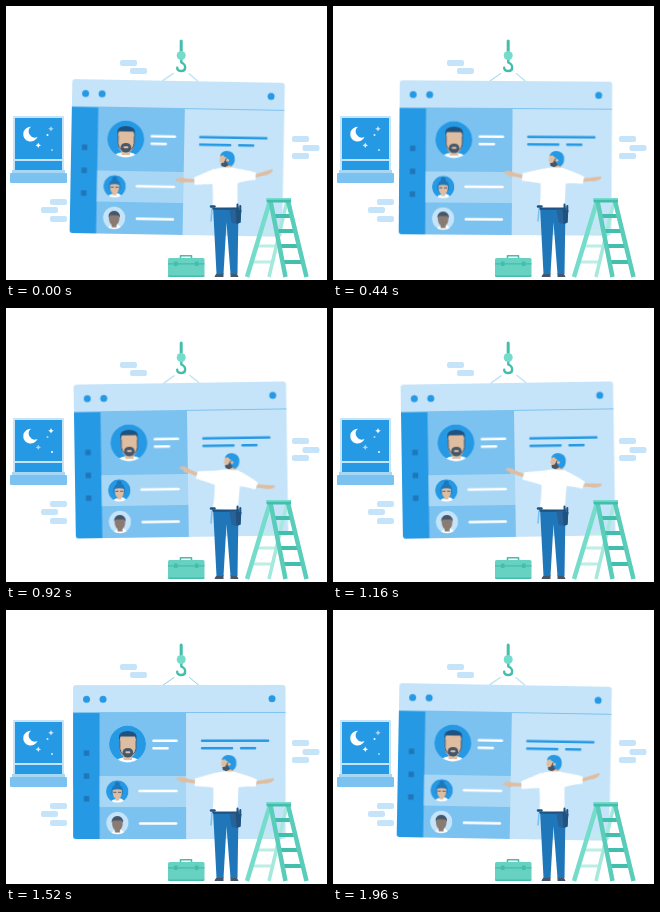
An HTML page that plays this animation: 321x274 px, repeating every 2 s.

```html
<!DOCTYPE html>
<html lang="en">
<head>
<meta charset="utf-8">
<title>Building a page</title>
<style>
  html, body { margin: 0; width: 100%; height: 100%; overflow: hidden; background: #fff; }
  svg { display: block; width: 100vw; height: 100vh; }

  .pale { fill: #c6e4f9; }
  .soft { fill: #a8d6f5; }
  .mid { fill: #7cc2f0; }
  .blue { fill: #2699e4; }
  .deep { fill: #1f77ba; }
  .navy { fill: #20527f; }
  .dark { fill: #44566a; }
  .skin { fill: #dfbda1; }
  .white { fill: #fff; }
  .teal { fill: #43beac; }
  .mint { fill: #75dccb; }
  .line { fill: none; stroke-linecap: round; stroke-linejoin: round; }
  .butt { stroke-linecap: butt; }

  .panel, .torso, .arm { animation: sway 1s cubic-bezier(.37, 0, .63, 1) infinite alternate; }
  .panel { --a: 1.05deg; --b: -.95deg; transform-origin: 175px 40px; animation-delay: -1.95s; }
  .torso { --a: -2.2deg; --b: 3deg; transform-origin: 220px 204px; animation-delay: -.07s; }
  .arm { --a: -8deg; --b: 8deg; animation-delay: -.07s; }
  .left { transform-origin: 209px 169px; }
  .right { transform-origin: 231px 168px; }
  .star { animation: twinkle 1s ease-in-out infinite alternate; }
  .late { animation-delay: -1s; }

  @keyframes sway {
    from { transform: rotate(var(--a)); }
    to { transform: rotate(var(--b)); }
  }
  @keyframes twinkle {
    from { opacity: .6; }
    to { opacity: 1; }
  }
</style>
</head>
<body>
<svg viewBox="0 0 321 274" preserveAspectRatio="none">
  <defs>
    <clipPath id="frame"><rect x="67" y="75" width="212.5" height="154" rx="3"/></clipPath>
    <clipPath id="big"><circle cx="121.5" cy="134" r="18.5"/></clipPath>
    <clipPath id="small"><circle r="11.2"/></clipPath>
    <rect id="brick" width="17" height="6" rx="2" class="pale"/>
    <path id="spark" class="white" d="M0-2.8Q.4-.4 2.8 0Q.4.4 0 2.8Q-.4.4-2.8 0Q-.4-.4 0-2.8Z"/>
  </defs>

  <!-- wall -->
  <use href="#brick" x="114" y="54"/>
  <use href="#brick" x="124" y="62"/>
  <use href="#brick" x="286" y="130"/>
  <use href="#brick" x="296.5" y="139"/>
  <use href="#brick" x="286" y="147"/>
  <use href="#brick" x="44" y="193"/>
  <use href="#brick" x="35" y="201"/>
  <use href="#brick" x="44" y="210"/>

  <!-- window -->
  <rect x="7" y="110" width="51" height="57" rx="1" class="pale"/>
  <rect x="9" y="112" width="47" height="41" class="blue"/>
  <rect x="9" y="155" width="47" height="9" class="blue"/>
  <rect x="6" y="164" width="53" height="3" class="soft"/>
  <rect x="4" y="167" width="57" height="10" rx="1" class="mid"/>
  <path class="white" d="M25 120.8A7.4 7.4 0 1 0 31.5 131A6.1 6.1 0 0 1 25 120.8Z"/>
  <g class="star"><use href="#spark" x="45" y="122.7"/><circle cx="46" cy="144" r="1" class="white"/></g>
  <g class="star late"><use href="#spark" x="32.3" y="139.3"/><circle cx="41.5" cy="129" r="1" class="white"/></g>

  <!-- hanging page -->
  <g class="panel">
    <path class="line" stroke="#8ccbed" d="M156.5 75.5 168 67.5M183.5 67.5 192.5 75"/>
    <g clip-path="url(#frame)">
      <rect x="67" y="75" width="213" height="155" class="pale"/>
      <rect x="67" y="102" width="213" height="1" class="mid"/>
      <rect x="67" y="103" width="27" height="127" class="blue"/>
      <rect x="93.5" y="103" width="86.5" height="127" class="mid"/>
      <rect x="93.5" y="166" width="86.5" height="31" class="soft"/>
    </g>
    <g class="blue">
      <circle cx="80.5" cy="89.3" r="3.5"/>
      <circle cx="97" cy="89.3" r="3.5"/>
      <circle cx="266" cy="88.7" r="3.5"/>
    </g>
    <g class="deep">
      <rect x="77.7" y="140.3" width="5.5" height="5.5"/>
      <rect x="77.7" y="163.3" width="5.5" height="5.5"/>
      <rect x="77.7" y="186" width="5.5" height="5.5"/>
    </g>
    <path class="line" stroke="#fff" stroke-width="2.6" d="M147.5 130.8h23M147.5 138.2h14M133.5 181h37M134 213.5h36"/>
    <path class="line" stroke="#2699e4" stroke-width="2.5" d="M196 130.8h66M196 138.3h30M235 138.3h14"/>

    <g clip-path="url(#big)">
      <circle cx="121.5" cy="134" r="18.5" class="blue"/>
      <path class="white" d="M108 155Q109 149 117 147.5h9.5Q134 149 135.5 155Z"/>
      <rect x="117.5" y="143" width="8.5" height="7" class="skin"/>
      <path class="skin" d="M113.5 125.5h16.5v13q-.5 9-8.2 9t-8.3-9Z"/>
      <path class="navy" d="M113 132v-6q.5-4.5 8.5-5 8.5.5 9 5v6l-1.5-5.5h-14.5Z"/>
      <path class="line" stroke="#44566a" d="M113.8 131v7.5q.5 4 3 6M130 131v7.5q-.5 4-3 6"/>
      <path class="dark" d="M116.5 143q0-5 5.3-5t5.3 5q-.8 4.6-5.3 4.6t-5.3-4.6Z"/>
      <path class="line" stroke="#dfbda1" stroke-width="2" d="M120.3 142.3h3"/>
    </g>

    <g transform="translate(111.2 181.5)" clip-path="url(#small)">
      <circle r="11.2" class="blue"/>
      <path class="white" d="M-8 12Q-6 8 0 7T8 12Z"/>
      <circle cy="-7.3" r="2.6" class="deep"/>
      <path class="deep" d="M-5.8 3V-1Q-5-6.8 0-6.8T5.8-1V3Z"/>
      <path class="skin" d="M-4.6-1.5Q0-3 4.6-1.5V2Q3.5 6 2 7V9H-2V7Q-3.5 6-4.6 2Z"/>
      <path class="line" stroke="#44566a" stroke-width=".9" d="M-3.6.8h2.4M1.2.8h2.4"/>
    </g>

    <g transform="translate(111.3 213)" clip-path="url(#small)">
      <circle r="11.2" class="pale"/>
      <path class="white" d="M-8 12Q-6 8 0 7T8 12Z"/>
      <path fill="#8a7b72" d="M-5.2-3H5.2V2Q4.5 6 2.5 7V9.5H-2.5V7Q-4.5 6-5.2 2Z"/>
      <path class="dark" d="M-5.6 0V-3Q-4-7 0-7T5.6-3V0L4.2-2.5H-4.2Z"/>
    </g>
  </g>

  <!-- hook -->
  <path class="line" stroke="#43beac" stroke-width="3" d="M175.2 35v10"/>
  <path class="line" stroke="#43beac" stroke-width="2.4" d="M175.3 53v3.5C180.5 58.5 180.3 64.8 175.5 65 172.7 65 171.2 63.5 171.2 61.8"/>
  <circle cx="175.2" cy="49.5" r="4.5" class="mint"/>

  <!-- toolbox -->
  <path class="line" stroke="#43beac" stroke-width="1.6" d="M174.5 252.5v-2.7h11v2.7"/>
  <rect x="162" y="252" width="36.5" height="19" rx="1.5" fill="#68d2c2"/>
  <path class="teal" d="M162 257.2h36.5v1.4H162ZM162 269.5h36.5v.5l-1 1H163l-1-1Z"/>
  <path class="teal" d="M168 255.5h3.5v4.5H168ZM189 255.5h3.5v4.5H189Z"/>

  <!-- ladder: two parallel-sided halves crossing below the top -->
  <path class="line butt" stroke="#bdeee6" stroke-width="3" d="M260 210h17M256 225h17M251 240h18M246 256h19"/>
  <path class="line butt" stroke="#a5e8dc" stroke-width="3.5" d="M281 195 263 271"/>
  <path class="line butt" stroke="#75dccb" stroke-width="4.5" d="M264 195 241 271"/>
  <path class="line butt" stroke="#43beac" stroke-width="4" d="M267 210h18M270 225h19M273 240h20M277 256h20"/>
  <path class="line butt" stroke="#5accba" stroke-width="4.5" d="M264.5 195 279.5 271M282 195 300.5 271"/>
  <rect x="260.5" y="192" width="24.5" height="4.5" rx="1" class="teal"/>
  <rect x="260.5" y="192" width="24.5" height="1.8" rx=".9" class="mint"/>

  <!-- worker -->
  <path class="dark" d="M208.5 271q1-4 5-4h4v4ZM224.5 271v-4h4.5q3 1 3.5 4Z"/>
  <path class="deep" d="M207 200h25.5L231.5 268H224.5L220.5 216 217.5 268H210.5Z"/>

  <g class="torso">
    <g class="arm left">
      <path class="line" stroke="#dfbda1" stroke-width="3.6" d="M192 171.5 178 168.5"/>
      <path class="skin" d="M181 167 175 165.2 171.5 166 170.5 168.2 174 168.7 176 171 181 171Z"/>
      <path class="white" d="M211 162.5Q200 165 189.5 167.5L188.5 175Q199 176 211 178Z"/>
    </g>
    <g class="arm right">
      <path class="line" stroke="#dfbda1" stroke-width="3.6" d="M247 174 261 172.8"/>
      <path class="skin" d="M258 171 263 170.5 267.5 169.8 268.3 171.5 265.5 173.8 260 175Z"/>
      <path class="white" d="M228 162Q238 164 251 170.5L249.5 177.5Q238 176.5 229 178Z"/>
    </g>
    <g transform="translate(1.7 0)">
      <path class="skin" d="M218.5 156h8v9h-8Z"/>
      <path class="skin" d="M214.5 149.5Q216 146.5 221 147L223 158 219 161 215.5 159.5 215 156.5 213.5 155Z"/>
      <path class="dark" d="M214.8 157.3 218 156.5 220 152.5 223 153 223 159 219 161.3 215.5 160Z"/>
      <path class="blue" d="M214.3 150Q215.5 145 221.5 145 229 145.5 229 153 229 159 224.5 160.5L221 157V152Q218.5 151 217.5 149.2Z"/>
      <circle cx="221.7" cy="154.3" r="1.5" class="skin"/>
    </g>
    <path class="white" d="M209 163.5Q214 161.5 218 161.5H228Q231 162 233 165L231.5 202.5H206.5Q208 190 207.5 177Z"/>
  </g>

  <path class="navy" d="M206 201.5H233.5v2.3H206Z"/>
  <path fill="#27639a" d="M223.5 203.5 235.3 204 234.5 216.5Q231 219 225.5 216.5Z"/>
  <path class="navy" d="M229.5 203.5 235.3 204.2 234.5 216.5 230.5 217.8Z"/>
  <path class="line" stroke="#20527f" stroke-width="2" d="M231.5 198.5v6M234.3 200v5"/>
  <path class="line" stroke="#7cc2f0" stroke-width="1.6" d="M206 203 205 215"/>
  <path class="line" stroke="#20527f" stroke-width="2.4" d="M205 200.5h3.5"/>
</svg>
</body>
</html>
```
